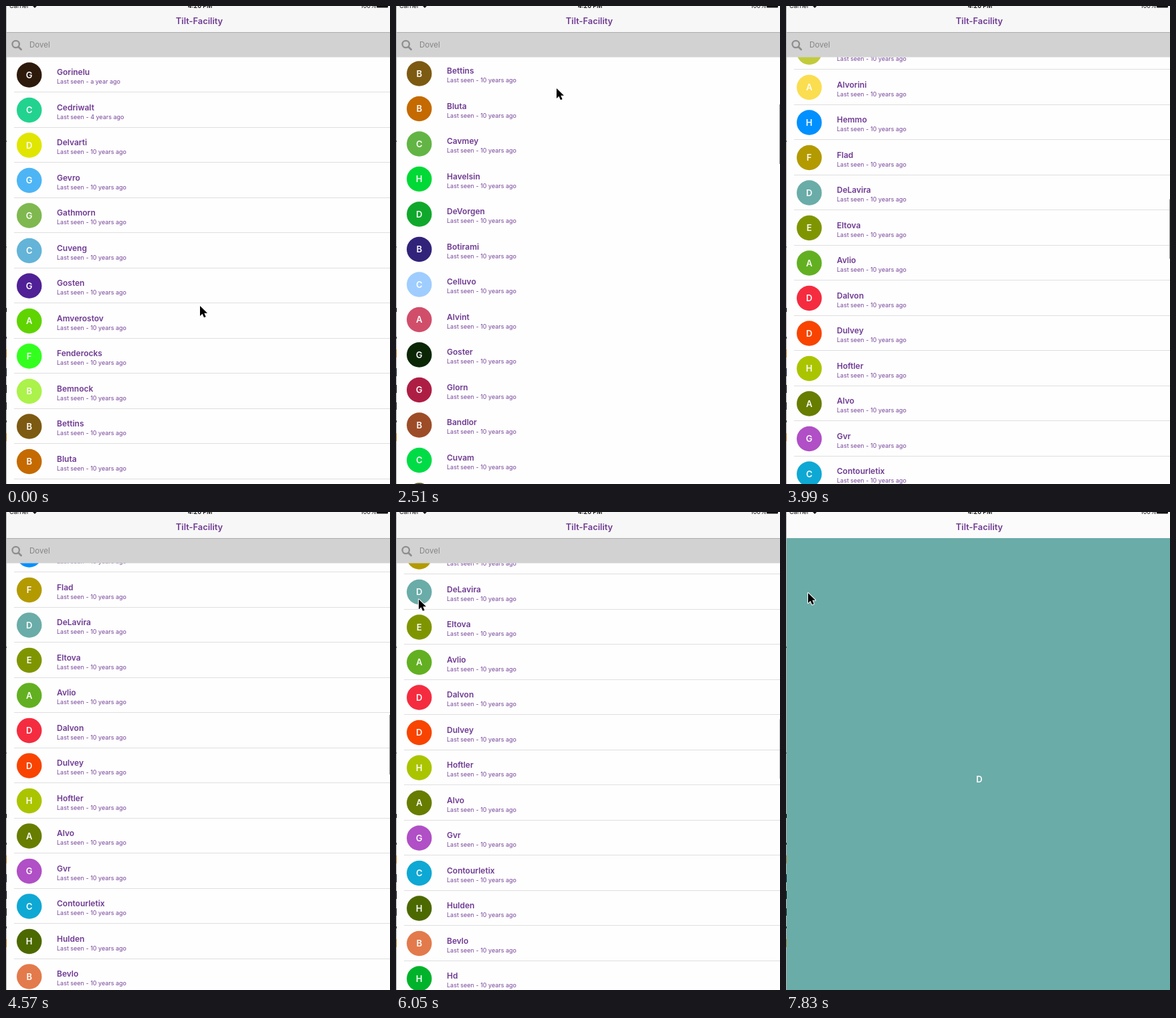
Write an HTML page that moves like this. It is 574 by 714 pixels and loops after 8000 ms.

```html
<!DOCTYPE html>
<html lang="en">
<head>
<meta charset="utf-8">
<title>Contact list</title>
<style>
html, body { margin: 0; width: 100%; height: 100%; overflow: hidden; background: #fefefe; }
svg { display: block; width: 574px; height: 714px; font-family: Inter, "Open Sans", sans-serif; }
.name { font-size: 12px; font-weight: 600; fill: #6f3a92; }
.seen { font-size: 9px; fill: #77459a; }
.initial { font-size: 13px; font-weight: 600; fill: #fff; text-anchor: middle; }
.title { font-size: 12.85px; font-weight: 600; fill: #6f3a92; text-anchor: middle; }
.status { font-size: 9px; fill: #111; }
.line { fill: #dfdfdf; }
</style>
</head>
<body>
<svg viewBox="0 0 574 714">
  <defs><clipPath id="view"><rect x="0" y="76" width="574" height="638"/></clipPath></defs>
  <rect width="574" height="714" fill="#fefefe"/>
  <g clip-path="url(#view)">
    <rect id="tapped" x="1" y="93" width="573" height="44" fill="#fbfbfb"/>
    <g id="list"></g>
    <rect id="bar" x="573" width="2" height="89" fill="#989898"/>
  </g>
  <g id="search">
    <rect y="40" width="574" height="36.5" fill="#d2d2d2"/>
    <g fill="none" stroke="#8e8e8e" stroke-width="2.3">
      <circle cx="14.7" cy="57" r="5.2"/>
      <path d="M18.6 61 L22.6 65" stroke-width="2.8" stroke-linecap="round"/>
    </g>
    <text x="35" y="61.5" font-size="11.5" fill="#858585">Dovel</text>
  </g>
  <rect id="header" width="574" height="39"/>
  <rect y="39" width="574" height="1" fill="#acacac"/>
  <rect id="card" fill="#6aaca8"/>
  <text id="cardText" class="initial">D</text>
  <text class="title" x="289" y="27.3">Tilt-Facility</text>
  <g class="status">
    <text x="5" y="2.5">Carrier</text>
    <path d="M39 -1 H47 L43 3 Z"/>
    <text x="290" y="2.5" text-anchor="middle" font-weight="600">4:26 PM</text>
    <text x="530" y="2.5">100%</text>
    <rect x="554" y="-5" width="17" height="7.5" rx="1"/>
  </g>
  <g id="edge"><rect width="1" height="714" fill="#b4b0b2"/></g>
  <path id="cursor" d="M0 0 V15 L3.5 11.8 L6 17.3 L8.7 16.2 L6.3 10.8 H11 Z"
        fill="#000" stroke="#fff" stroke-width="2" stroke-linejoin="round" paint-order="stroke"/>
</svg>
<script>
const LOOP = 8000, PITCH = 52.5, END = 1768.5;
const $ = id => document.getElementById(id);

const people = `Gorinelu 2e1a0a,Cedriwalt 22d38f,Delvarti e0e600,Gevro 4db5f5,Gathmorn 7fb84f,
Cuveng 63b4d8,Gosten 4f2096,Amverostov 5fd400,Fenderocks 33ff1f,Bemnock abf24a,Bettins 7d5a12,
Bluta c46a00,Cavmey 62b544,Havelsin 00d936,DeVorgen 10a82c,Botirami 32237a,Celluvo 9fcdff,
Alvint d14e6a,Goster 0a2605,Glorn ae1e44,Bandlor 9d4c28,Cuvam 00dc46,Bravell 5c5428,
Corbeld b07a3a,Cavrenda 68b31a,Brusk 87453a,Avol 00df94,Boltan 9566c9,Bormills 5c4300,
Cantroller ff5cd6,Bomm c2cb3b,Alvorini fbdd50,Hemmo 0090ff,Flad b39a00,DeLavira 6aaca8,
Eltova 7f9500,Avlio 62b021,Dalvon f52c40,Dulvey f84400,Hoftler abc400,Alvo 667d00,Gvr b04fc6,
Contourletix 0ea8d4,Hulden 4c6900,Bevlo e37a4b,Hd 00b32b`.split(",").map(p => p.trim().split(" "));

function set(el, attrs) {
  for (const k in attrs) el.setAttribute(k, attrs[k]);
  return el;
}
function add(parent, tag, attrs, text = "") {
  const el = set(document.createElementNS("http://www.w3.org/2000/svg", tag), attrs);
  el.textContent = text;
  return parent.appendChild(el);
}

const lines = people.map(([name, color], i) => {
  const y = 103 + i * PITCH;
  const ago = ["a year", "4 years"][i] || "10 years";
  add($("list"), "circle", { cx: 34.75, cy: y, r: 18.75, fill: "#" + color });
  add($("list"), "text", { class: "initial", x: 34.7, y: y + 4.7 }, name[0]);
  add($("list"), "text", { class: "name", x: 76, y: y + 0.3 }, name);
  add($("list"), "text", { class: "seen", x: 76, y: y + 13.2 }, `Last seen - ${ago} ago`);
  return add($("list"), "rect", { class: "line", x: 12, width: 562, height: 1 });
});

// slivers of the window behind, along the left border
[[201, 2, "#444"], [359, 2, "#666"], [451, 6, "#000"], [494, 3, "#222"], [513, 12, "#b8741c"],
 [541, 12, "#0a1a33"], [566, 12, "#02060f"], [592, 11, "#222"], [619, 3, "#222"], [638, 12, "#b8741c"]]
  .forEach(([y, height, fill]) => add($("edge"), "rect", { y, width: 1, height, fill }));

// piecewise-linear lookup in rows of [key, ...values]
function along(keys, k) {
  let i = 0;
  while (i < keys.length - 2 && k >= keys[i + 1][0]) i++;
  const [a, b] = [keys[i], keys[i + 1]];
  const f = Math.min(1, Math.max(0, (k - a[0]) / (b[0] - a[0])));
  return a.slice(1).map((v, j) => v + (b[j + 1] - v) * f);
}

// the picture advances in uneven ticks: [ms, tick]
const ticks = [[0, 0], [140, 1], [1340, 9], [2510, 17], [3690, 25], [4860, 33],
  [6050, 41], [6800, 46], [7830, 53], [8000, 54]];
const pointer = [[0, 290, 448], [9, 290, 448], [11, 256, 448], [17, 240, 123], [21, 234, 378],
  [24, 234, 259], [26, -20, 230], [31, -20, 150], [33, 14, 146], [36, 35, 140], [40, 35, 140], [42, 33, 121]];
const barFade = [[10, 0], [11, 1], [40, 1], [42, 0]];
const cardBox = [[0, 20, 98, 56, 136], [1, 1, 39, 577, 759]];

// two flicks, each followed by momentum decay
function scrollAt(n) {
  const decay = from => 0.746 ** (n - from);
  if (n < 11) return 0;
  if (n <= 17) return 527 * ((n - 11) / 6) ** 2;
  if (n <= 21) return 527 + 1071 * (1 - decay(17));
  if (n <= 24) return 1266 + (n - 21) * 39.7;
  return n < 40 ? END - 159.5 * decay(27) : END;
}

function draw(t) {
  const n = Math.floor(along(ticks, t)[0] + 1e-6);
  const scroll = scrollAt(n);
  set($("list"), { transform: `translate(0 ${-scroll})` });
  // separators sit on whole pixels and vanish in the fast part of the scroll
  lines.forEach((line, i) => {
    set(line, { y: Math.round(128.25 + i * PITCH - scroll) + scroll, opacity: n > 15 && n < 19 ? 0 : 1 });
  });
  set($("bar"), { y: 78 + scroll / 7.64, opacity: along(barFade, n)[0] });
  set($("cursor"), { transform: `translate(${along(pointer, n)})` });

  const open = n >= 46;
  const p = (1 - Math.cos(Math.PI * Math.min(1, Math.max(0, (n - 45) / 8)))) / 2;
  const [x, y, right, bottom] = along(cardBox, p);
  set($("card"), { x, y, width: right - x, height: bottom - y, rx: Math.max(0, 18 * (1 - p * 6)) });
  set($("cardText"), { x: (x + right) / 2, y: (y + bottom) / 2 + 4.7 });
  for (const id of ["card", "cardText", "tapped"]) $(id).style.display = open ? "" : "none";
  set($("header"), { fill: open ? "#fbfbfb" : "#f7f7f7" });
}

const start = performance.now();
(function frame() {
  draw((performance.now() - start) % LOOP);
  requestAnimationFrame(frame);
})();
</script>
</body>
</html>
```
